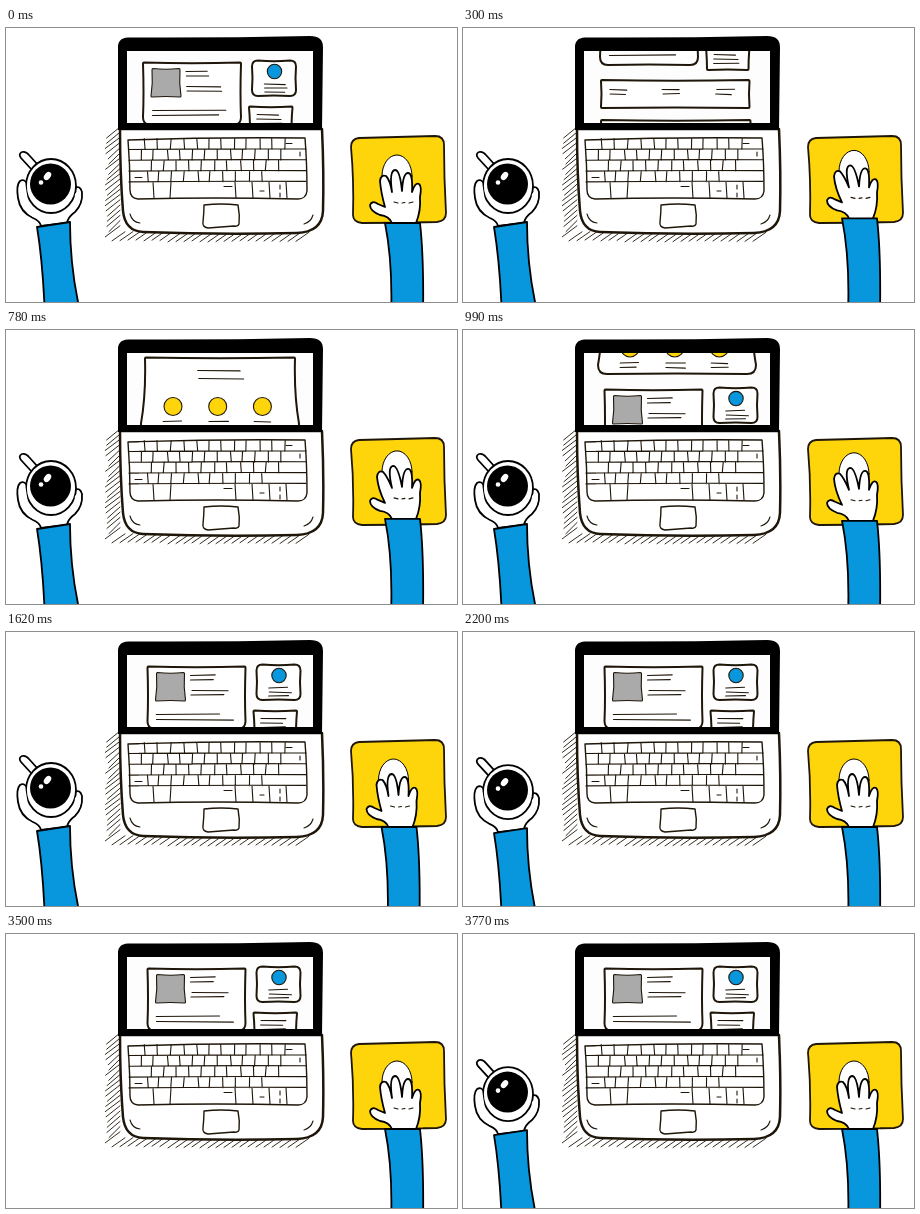
Write an HTML page that moves like this. It is 451x274 px and loops after 4.77 s.

```html
<!DOCTYPE html>
<html lang="en">
<head>
<meta charset="utf-8">
<title>Desk with laptop</title>
<style>
html, body { margin: 0; height: 100%; overflow: hidden; background: #fff; }
svg { display: block; width: 451px; height: 274px; }
.ink { fill: none; stroke: #1f160a; stroke-width: 1.1; stroke-linecap: round; stroke-linejoin: round; }
.box { fill: #fff; stroke-width: 2; }
.bold { stroke: #000; stroke-width: 1.8; fill: #fff; }
.blue { fill: #0896dd; }
.gray { fill: #aaa; }
.sun { fill: #fed40a; }
</style>
</head>
<body>
<svg viewBox="0 0 451 274">
  <clipPath id="view"><path d="M121 23H307V95H121Z"/></clipPath>

  <path id="hatch" class="ink" style="stroke-width:.9"/>
  <path class="ink box" style="stroke-width:2.5" d="M114 101Q114 145 117 183Q119 203 137 204Q215 207 291 205Q316 204 317 183Q318 145 316 101Z"/>
  <path d="M112 102V21Q111 10 122 9.500Q215 10 304 8Q317 8 317 19L316 102Z"/>
  <path d="M121 23H307V95H121Z" fill="#fdfdfd"/>
  <g clip-path="url(#view)"><g id="page"></g></g>
  <path id="keys" class="ink"/>
  <path class="ink" style="stroke-width:1.4" d="M122 112Q210 109 299 110Q301 135 301 163Q300 171 292 171Q208 169 132 171Q124 170 124 162Q124 137 122 112Z"/>
  <path class="ink" style="stroke-width:1.4" d="M198 177Q215 175 232 177Q234 187 233 196Q232 199 228 198L202 200Q196 199 197 194Q198 185 198 177Z"/>
  <path class="ink" d="M280 115.500h6M218 158.500h8M129 149.500h7M294 124v4M254 163h4M274 157v4m0 4v4M124 186q2 8 10 9M307 187q-2 7 -9 9"/>

  <path class="ink sun" style="stroke-width:1.8" d="M353 110Q392 109 429 108Q438 108 438 117Q438 150 440 185Q440 193 431 194Q394 195 356 195Q347 194 347 187Q348 152 345 119Q345 111 353 110Z"/>
  <g id="right">
    <ellipse class="ink bold" style="stroke-width:1" cx="391" cy="148" rx="15" ry="21"/>
    <path id="hand" class="ink bold"/>
    <path class="ink" d="M388 174l4 1m4 0l3 -.5m4 .5l4 -1"/>
    <path class="ink bold blue" d="M379 195H414Q418 230 417 290H385Q387 235 379 195Z"/>
  </g>

  <g id="left">
    <path class="ink bold" d="M35 198Q34 193 27 190Q14 184 12 170Q10 157 14 153Q19 150 22 158L69 160Q74 157 76 164Q77 176 69 184Q62 189 61 195Z"/>
    <path class="ink bold" d="M26 142L15 130Q12 126 16 124Q20 123 23 127L32 137"/>
    <ellipse class="ink bold" cx="45" cy="158" rx="25" ry="27"/>
    <path fill="#fff" d="M13 158Q15 152 19 154L22 173Q26 182 31 185L27 189Q13 181 13 158ZM69 166Q74 160 75 165Q75 177 67 184Z"/>
    <circle cx="44.500" cy="156" r="20.500"/>
    <ellipse cx="41.500" cy="148" rx="4.500" ry="3" transform="rotate(-50 41.500 148)" fill="#fff"/>
    <circle cx="35" cy="154.500" r="2.300" fill="#fff"/>
    <path class="ink bold blue" d="M31 199L64 194Q64 235 72 274L74 290H39Q37 235 31 199Z"/>
  </g>
</svg>
<script>
const get = id => document.getElementById(id);
const repeat = (n, fn) => Array.from({ length: n }, (_, i) => fn(i)).join('');
const clamp = p => Math.max(0, Math.min(1, p));
const smooth = p => p * p * (3 - 2 * p);
const LOOP = 4770, STEP = 30, PAGE = 277;

let seed = 7;
const random = () => (seed = seed * 16807 % 2147483647) / 2147483647;
const jitter = size => (random() - 0.5) * size;

// Hand-drawn box with top and bottom corner radii; flare widens its foot
function card(x, y, w, h, r, foot = r, flare = 0, look = 'box') {
  const right = x + w, low = y + h, mid = y + h / 2;
  return `<path class="ink ${look}" d="M${x + r} ${y}Q${x + w / 2} ${y + 1.5} ${right - r} ${y}
    Q${right} ${y} ${right} ${y + r}Q${right - 1} ${mid} ${right + flare} ${low - foot}
    Q${right + flare} ${low} ${right + flare - foot} ${low}
    Q${x + w / 2} ${low - 1} ${x - flare + foot} ${low}
    Q${x - flare} ${low} ${x - flare} ${low - foot}Q${x + 1} ${mid} ${x} ${y + r}Q${x} ${y} ${x + r} ${y}Z"/>`;
}

// Lines of scribbled text
const scribble = (x, y, w, n = 1, gap = 4.5) => '<path class="ink" d="' + repeat(n, i =>
  `M${x + jitter(2)} ${y + i * gap}l${w * (1 - 0.2 * random())} ${jitter(1.5)}`) + '"/>';

const dot = (x, y, r, look) => `<circle class="ink ${look}" cx="${x}" cy="${y}" r="${r}"/>`;

const header = () =>
  card(137, 34.5, 98, 62.5, 1, 8) + card(146, 40.5, 28, 28.5, 1, 1, 1, 'gray') +
  scribble(181, 43.5, 26, 2) + scribble(181, 58.5, 40, 2) + scribble(146, 82.5, 77, 2, 5) +
  card(246, 32.5, 44, 35.5, 6) + dot(268.5, 43.5, 7.2, 'blue') + scribble(258, 56, 23, 3, 4) +
  card(243, 78.5, 43.5, 23.5, 1, 1, -1) + scribble(251, 86.5, 26, 3);

const strip = () => card(138, 112, 148.5, 28, 1) +
  repeat(3, i => scribble(147 + i * 53, 121.5, 18, 2));

const gallery = () => card(138, 152, 149.5, 60, 1, 9) + scribble(171, 160.5, 24) +
  scribble(208, 160.5, 30) + card(152, 168, 31.5, 23, 4) + scribble(190, 171, 28, 5) +
  card(231, 168.5, 46, 22, 1, 1, 0.5, 'gray') + scribble(189, 202, 40);

const badges = () => card(139, 221, 150, 75, 1, 9, 4) + scribble(192, 234, 46, 2, 8) +
  repeat(3, i => dot(167 + i * 44.7, 270, 9, 'sun') + scribble(158 + i * 44.7, 285, 20, 2));

get('page').innerHTML = header() + strip() + gallery() + badges() +
  `<g transform="translate(4.5 ${PAGE})">${header()}</g>`;

// Keyboard: four staggered rows of equal keys, then the space bar row
get('keys').setAttribute('d', repeat(4, row => {
  const y = 110.5 + row * 10.8, first = 139 - row % 2 * 4 + (row > 1) * 6;
  return repeat(12 - (row > 1) - (row > 2), k =>
    `M${first + k * 12.7 + jitter(2)} ${y}l${jitter(2)} 10.8`) +
    `M123 ${y + 11}Q210 ${y + 10} 300 ${y + 10.5}`;
}) + 'M147 154l1 16M165 154l-1 16' + repeat(4, k => `M${229 + k * 17} 154l1 16`));

get('hatch').setAttribute('d',
  repeat(20, i => `M${101 + jitter(4)} ${110 + i * 5.2}L114 ${99 + i * 5.2}`) +
  repeat(24, i => `M${106 + i * 8} ${213 + jitter(2)}l13 -9`));

// Piecewise linear value through [time, value] points
function track(t, points) {
  let [t0, v0] = points[0];
  for (const [t1, v1] of points.slice(1)) {
    if (t < t1) return v0 + (v1 - v0) * clamp((t - t0) / (t1 - t0));
    [t0, v0] = [t1, v1];
  }
  return v0;
}

// The index and middle fingers lean out as the hand spreads
function handPath(spread) {
  const index = 374 - 3 * spread, middle = 389 - 2 * spread;
  return `M386 195Q383 188 374 187Q364 183 364 177Q366 172 372 176L379 179
    Q${index + 1} 165 ${index} 153Q${index + 1} 146 ${index + 6} 148Q${index + 10} 152 386 164
    Q${middle - 6} 143 ${middle} 142Q${middle + 5} 142 396 163
    Q397 145 402 145Q407 145 406 164Q409 154 413 156Q416 158 414 169Q415 183 410 195`;
}

function draw(now) {
  const t = Math.floor(now % LOOP / STEP) * STEP;
  const move = (id, x, y) => get(id).setAttribute('transform', `translate(${x} ${y})`);

  move('page', 0, -track(t, [[0, 0], [120, 18], [300, 60], [1080, PAGE]]));

  const lift = track(t, [[0, 0], [540, 8.3], [1080, 3.4], [1380, 3.4], [1620, 0]]);
  move('right', track(t, [[1380, 0], [1620, -3.5], [1800, 0]]), -lift);
  get('hand').setAttribute('d', handPath(clamp(lift / 3.4)));

  const away = smooth(clamp((t - 2170) / 300)) - smooth(clamp((t - 3470) / 300));
  move('left', 0, 165 * away);
}

let start;
function tick(now) {
  start ??= now;
  draw(now - start);
  requestAnimationFrame(tick);
}
draw(0);
requestAnimationFrame(tick);
</script>
</body>
</html>
```
